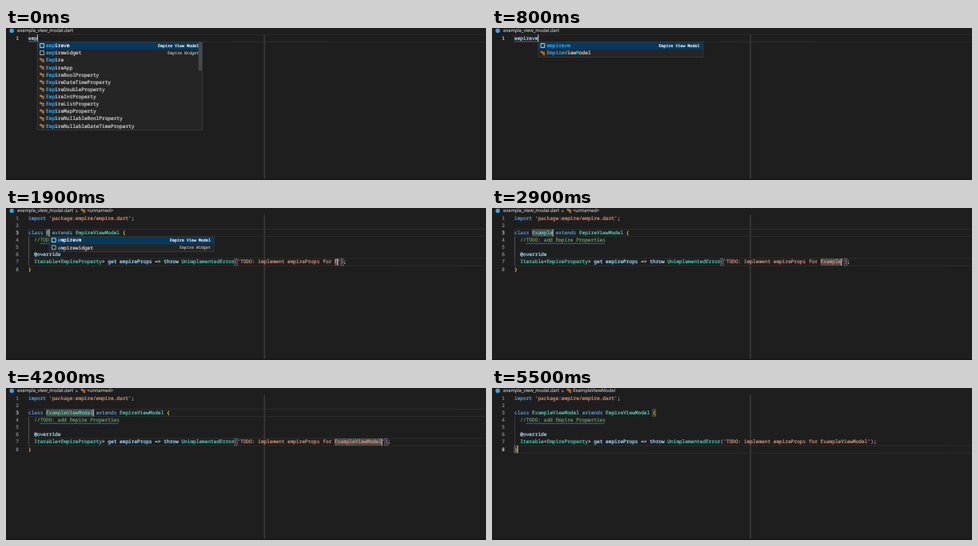
Recreate the animation shown at these times as an HTML page with a canvas. Size 600x190 px, loop 5600 ms.

```html
<!DOCTYPE html>
<html lang="en">
<head>
<meta charset="utf-8">
<title>Snippet completion in a code editor</title>
<style>
html, body { margin: 0; width: 600px; height: 190px; overflow: hidden; background: #1f1e1f; }
canvas { display: block; }
</style>
</head>
<body>
<canvas id="stage" width="600" height="190"></canvas>
<script>
const ctx = document.getElementById('stage').getContext('2d');
const LOOP = 5600, CW = 3.68, LH = 9.13, LEFT = 28, TOP = 8.2;
const MONO = '"Noto Sans Mono", monospace', SANS = '"Open Sans", sans-serif';
const C = {
  back: '#1f1e1f', key: '#569cd6', type: '#4ec9b0', str: '#ce9178', note: '#6a9955',
  name: '#9cdcfe', text: '#d4d4d4', gold: '#f0cc18', pink: '#da70d6',
  match: '#2aaaff', orange: '#ee9d28', error: '#f14c4c', info: '#3794ff'
};

// [time, text so far]
const queries = [[0, 'emp'], [100, 'empi'], [300, 'empir'], [400, 'empire'], [700, 'empirev'], [800, 'empirevm']];
const INSERT = 1000, EXIT = 5100;
const names = [[INSERT, ''], [1900, 'E'], [2200, 'Ex'], [2400, 'Exa'], [2700, 'Examp'], [2900, 'Example'],
  [3200, 'ExampleV'], [3400, 'ExampleVi'], [3500, 'ExampleVie'], [3600, 'ExampleView'], [3800, 'ExampleViewM'],
  [3900, 'ExampleViewMo'], [4000, 'ExampleViewMod'], [4100, 'ExampleViewMode'], [4200, 'ExampleViewModel']];

const snippets = [['empirevm', 'Empire View Model'], ['empirewidget', 'Empire Widget']];
const classes = ['', 'App', 'BoolProperty', 'DateTimeProperty', 'DoubleProperty', 'IntProperty', 'ListProperty',
  'MapProperty', 'NullableBoolProperty', 'NullableDateTimeProperty'].map(s => ['Empire' + s]);

const last = (list, t) => list.filter(e => e[0] <= t).pop();
const colX = col => LEFT + col * CW;
const lineTop = line => TOP + line * LH;
const baseline = line => lineTop(line) + 6.5;

function rect(x, y, w, h, color) {
  ctx.fillStyle = color;
  ctx.fillRect(x, y, w, h);
}

function frame(x, y, w, h, color, weight = 0.6) {
  ctx.strokeStyle = color;
  ctx.lineWidth = weight;
  ctx.strokeRect(x, y, w, h);
}

// A hairline outline gives the small type its weight
function write(str, x, y, color, size = 6.13, family = MONO, align = 'left') {
  ctx.font = `${size}px ${family}`;
  ctx.textAlign = align;
  ctx.fillStyle = ctx.strokeStyle = color;
  ctx.lineWidth = 0.22;
  ctx.fillText(str, x, y);
  ctx.strokeText(str, x, y);
}

// Alternating text and colour
function code(line, ...parts) {
  let x = LEFT;
  for (let i = 0; i < parts.length; i += 2) {
    write(parts[i], x, baseline(line), parts[i + 1]);
    x += parts[i].length * CW;
  }
}

function squiggle(line, col, length, color) {
  const y = baseline(line) + 2.2, end = colX(col + length);
  ctx.beginPath();
  for (let x = colX(col), k = 0; x <= end; x += 1.4, k++) ctx.lineTo(x, y + (k % 2 ? 0.5 : -0.5));
  ctx.strokeStyle = color;
  ctx.lineWidth = 0.7;
  ctx.stroke();
}

const bracket = (line, col) => frame(colX(col), lineTop(line) + 0.3, CW, LH - 0.6, '#888888');
const caret = (line, col) => rect(colX(col) - 0.2, lineTop(line) + 0.1, 1, LH - 0.2, '#d0d0d0');
const activeLine = line => frame(LEFT, lineTop(line), 580, LH, '#303030', 0.8);

function classIcon(x, y) {
  frame(x + 0.6, y - 2, 1.8, 1.8, C.orange, 0.8);
  frame(x + 4, y - 0.9, 1.2, 1, C.orange, 0.8);
  frame(x + 4, y + 1.4, 1.2, 1, C.orange, 0.8);
  rect(x + 2, y - 0.7, 1.8, 0.7, C.orange);
  rect(x + 2.6, y - 0.5, 0.7, 2.6, C.orange);
}

// Indices of the label's letters that the query matches in order
function matches(label, query) {
  const hits = new Set();
  let from = 0;
  for (const ch of query.toLowerCase()) {
    const at = label.toLowerCase().indexOf(ch, from);
    hits.add(at);
    from = at + 1;
  }
  return hits;
}

function popup(line, col, query, items) {
  const x = colX(col), y = lineTop(line + 1), w = 206.5, h = items.length * LH + 1;
  rect(x, y, w, h, '#252526');
  rect(x, y + 0.5, w, LH, '#04395e');
  items.forEach(([label, detail], row) => {
    const base = y + 6.8 + row * LH, hits = matches(label, query);
    if (detail) {
      frame(x + 3.6, base - 4.6, 4.8, 4.8, row ? '#b4b8bc' : '#d8e4ee', 0.9);
      write(detail, x + 202, base - 0.2, row ? '#a0a0a0' : '#f0f0f0', 5, MONO, 'right');
    } else classIcon(x + 3, base - 2.2);
    [...label].forEach((ch, i) =>
      write(ch, x + 11 + i * CW, base, hits.has(i) ? C.match : row ? '#cccccc' : '#ffffff'));
  });
  if (items.length > 9) rect(x + 201.5, y + 0.5, 4.5, 35.5, '#484848');
  frame(x + 0.3, y + 0.3, w - 0.6, h - 0.6, '#454545');
}

function header(t) {
  ctx.beginPath();
  ctx.arc(7.2, 3.4, 2.7, 0, 7);
  ctx.fillStyle = '#3aa5e6';
  ctx.fill();
  write('example_view_model.dart', 14, 5.4, '#a9a9a9', 5.8, SANS);
  if (t < 1100) return;
  write('>', 86.6, 5.5, '#a9a9a9', 6);
  if (t < 1600) {
    write('[', 92.5, 5.2, '#75beff', 5.5);
    write(']', 96, 5.2, '#75beff', 5.5);
    rect(95, 2.4, 1.8, 1.8, '#75beff');
  } else classIcon(93.5, 3.3);
  write(t < 1600 ? 'empirevm' : t < 4800 ? '<unnamed>' : 'ExampleViewModel', 101.3, 5.4, '#a9a9a9', 5.8, SANS);
}

function lineNumbers(count, active) {
  for (let i = 0; i < count; i++)
    write(i + 1, 16, baseline(i), i === active ? '#c6c6c6' : '#858585', 6.13, MONO, 'right');
}

function typingQuery(t) {
  const [since, query] = last(queries, t);
  activeLine(0);
  lineNumbers(1, 0);
  code(0, query, C.name);
  squiggle(0, 0, query.length, C.error);
  if ((t - since) % 1000 < 600) caret(0, query.length);
  const narrow = query.length > 6;
  popup(0, query.length, query, narrow ? [snippets[0], ['EmpireViewModel']] : [...snippets, ...classes]);
}

function editingClass(t) {
  const [edited, name] = last(names, t), n = name.length, filling = t < EXIT;
  lineNumbers(8, filling ? 2 : 7);
  rect(LEFT + 0.1, lineTop(3), 0.8, 4 * LH, filling ? '#606060' : '#404040');
  if (filling) {
    activeLine(2);
    activeLine(6);
    rect(colX(6), lineTop(2), n * CW, LH, '#4b4b4b');
    rect(colX(104), lineTop(6), n * CW, LH, '#4b4b4b');
    bracket(6, 70);
    bracket(6, 105 + n);
  } else {
    activeLine(7);
    bracket(2, 31 + n);
    bracket(7, 0);
  }
  code(0, 'import ', C.key, "'package:empire/empire.dart'", C.str, ';', C.text);
  code(2, 'class ', C.key, name, C.type, ' extends ', C.key, 'EmpireViewModel ', C.type, '{', C.gold);
  code(3, '  //TODO: add Empire Properties', C.note);
  code(5, '  @override', C.name);
  code(6, '  Iterable', C.type, '<', C.text, 'EmpireProperty', C.type, '> ', C.text, 'get empireProps ', C.name,
    '=> ', C.text, 'throw ', C.name, 'UnimplementedError', C.type, '(', C.pink,
    `'TODO: implement empireProps for ${name}'`, C.str, ')', C.pink, ';', C.text);
  code(7, '}', C.gold);

  if (t >= 1200) squiggle(3, 4, 27, C.info);
  if (t >= 1200 && !n) squiggle(2, 7, 7, C.error);
  if (t >= 1200 && t < 1600) {
    rect(colX(8), lineTop(0), 2 * CW, LH, C.back);
    ctx.beginPath();
    ctx.arc(61, 12, 1.9, 0, 7);
    ctx.fillStyle = '#ffcc00';
    ctx.fill();
    rect(60.1, 13.8, 1.8, 1.8, '#d8c070');
  }
  if (n === 1) popup(2, 7, name, snippets);
  if ((t - (filling ? edited : EXIT)) % 1000 < 600) {
    if (filling) {
      caret(2, 6 + n);
      caret(6, 104 + n);
    } else caret(7, 1);
  }
}

function draw(now) {
  const t = now % LOOP;
  ctx.textRendering = 'geometricPrecision';
  ctx.lineJoin = 'round';
  rect(0, 0, 600, 190, C.back);
  rect(0, 188.5, 600, 1.5, '#171717');
  rect(322.5, 8.5, 1, 180, '#484848');
  header(t);
  (t < INSERT ? typingQuery : editingClass)(t);
}

const start = performance.now();
function tick() {
  draw(performance.now() - start);
  requestAnimationFrame(tick);
}
tick();
</script>
</body>
</html>
```
